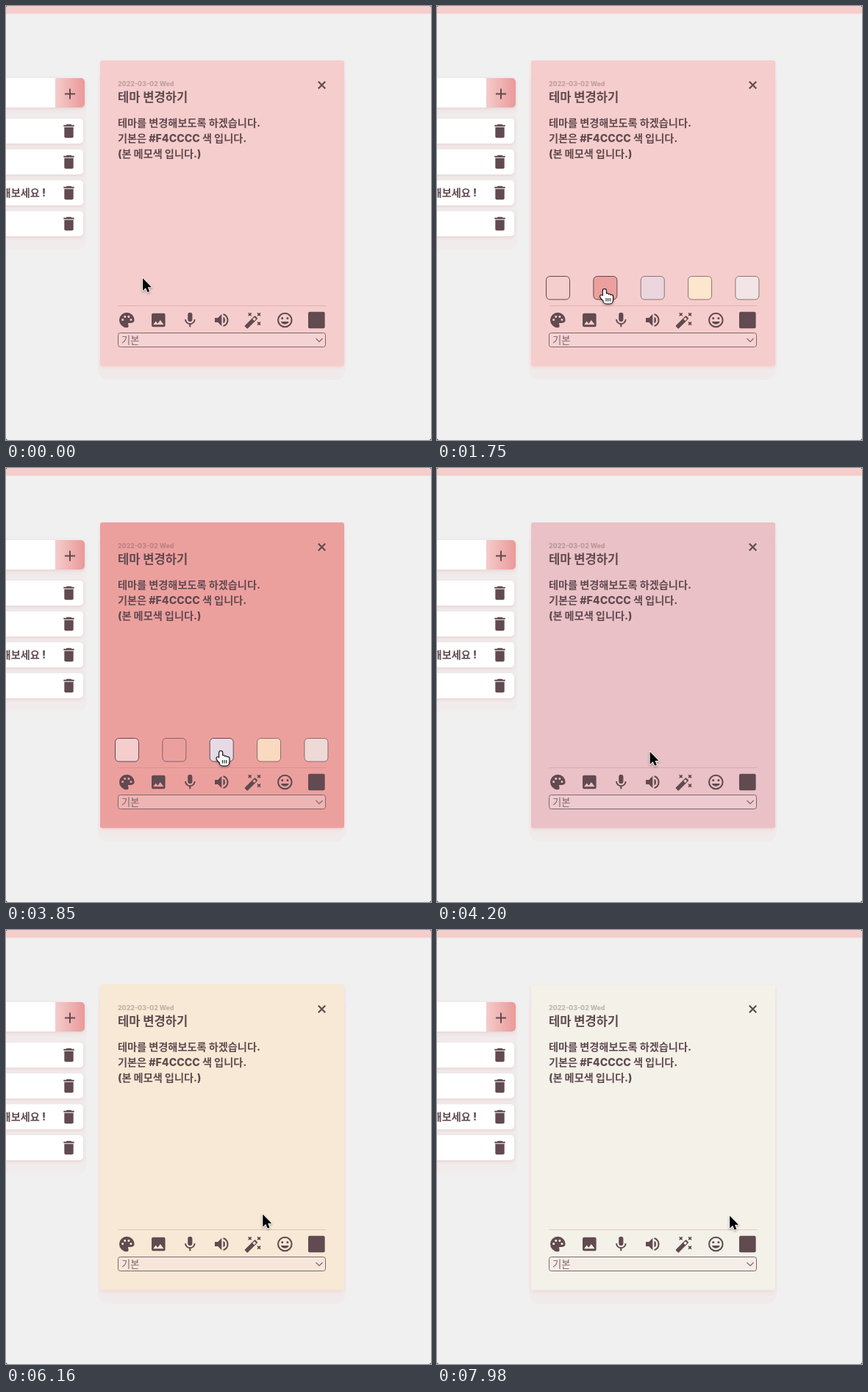
An HTML page with a canvas that plays this animation: 578 by 590 pixels, repeating every 8000 ms.

```html
<!DOCTYPE html>
<html lang="ko">
<head>
<meta charset="utf-8">
<style>
html, body { margin: 0; width: 100%; height: 100%; overflow: hidden; background: #f0f0f0; }
canvas { display: block; }
</style>
</head>
<body>
<canvas id="stage" width="578" height="590"></canvas>
<script>
const ctx = document.getElementById('stage').getContext('2d');
const LOOP = 8000;
const INK = '#614a50';
const INK_SOFT = '#80666b';
const FONT = 'Inter, "Noto Sans CJK KR", "Noto Sans CJK", sans-serif';

const THEMES = [[245, 205, 204], [236, 160, 158], [231, 218, 229], [255, 241, 205], [240, 241, 240]];
const FADE = 400;
const START = { x: 186, y: 370 };
const HOME = { x: 168, y: 424 };

// Each round: swatches open, the pointer leaves the palette button, reaches the next swatch, picks it.
const ROUNDS = [
  { open: 1120, leave: 1500, reach: 1750, pick: 2300 },
  { open: 3430, leave: 3600, reach: 3850, pick: 4070 },
  { open: 4970, leave: 5108, reach: 5800, pick: 6010 },
  { open: 6820, leave: 6860, reach: 7290, pick: 7790 }
];
const PRESS_LEAD = 180, LINGER = 80, RETURN = 600, ENTER = 80;

const swatchX = i => 148.5 + 64.35 * i;
const clamp = v => Math.min(1, Math.max(0, v));
const smooth = u => u * u * (3 - 2 * u);
const easeOut = u => 1 - (1 - u) ** 2;
const rgb = c => `rgb(${c.map(Math.round).join()})`;

// CSS "ease" curve
function ease(p) {
  if (p <= 0 || p >= 1) return clamp(p);
  const bez = (a, b, u) => 3 * a * u * (1 - u) ** 2 + 3 * b * u * u * (1 - u) + u ** 3;
  let lo = 0, hi = 1;
  for (let i = 0; i < 20; i++) {
    const mid = (lo + hi) / 2;
    if (bez(.25, .25, mid) < p) lo = mid; else hi = mid;
  }
  return bez(.1, 1, lo);
}

const legs = [];
const move = (from, to, x, y, curve) => legs.push({ from, to, x, y, curve });
move(0, RETURN, HOME.x, HOME.y, smooth);
ROUNDS.forEach(({ leave, reach, pick }, i) => {
  const x = swatchX(i + 1) + 15;
  move(leave, reach - ENTER, x, 400, easeOut);
  move(reach - ENTER, reach, x, 385, smooth);
  move(pick + LINGER, pick + LINGER + RETURN, HOME.x, HOME.y, smooth);
});

function pointerAt(t) {
  let { x, y } = START;
  for (const leg of legs) {
    const p = leg.curve(clamp((t - leg.from) / (leg.to - leg.from)));
    x += (leg.x - x) * p;
    y += (leg.y - y) * p;
  }
  return [x, y];
}

const memoColor = t => ROUNDS.reduce((color, { pick }, i) => {
  const p = ease((t - pick) / FADE);
  return color.map((v, k) => v + (THEMES[i + 1][k] - v) * p);
}, THEMES[0]);

const isOpen = t => ROUNDS.some(r => t >= r.open && t < r.pick);
const hasTooltip = t => ROUNDS.some((r, i) => {
  const arrival = i ? ROUNDS[i - 1].pick + LINGER + RETURN : RETURN;
  return t >= arrival - 100 && t < r.leave + 100;
});

function box(x, y, w, h, r, fill, stroke) {
  ctx.beginPath();
  ctx.roundRect(x, y, w, h, r);
  if (fill) { ctx.fillStyle = fill; ctx.fill(); }
  if (stroke) { ctx.strokeStyle = stroke; ctx.lineWidth = 1; ctx.stroke(); }
}

function shadowed(color, dy, blur, draw) {
  ctx.save();
  ctx.shadowColor = color;
  ctx.shadowOffsetY = dy;
  ctx.shadowBlur = blur;
  draw();
  ctx.restore();
}

function text(str, x, y, size, weight = 800, color = INK, align = 'left') {
  ctx.font = `${weight} ${size}px ${FONT}`;
  ctx.textAlign = align;
  ctx.fillStyle = color;
  ctx.fillText(str, x, y);
}

function line(color, width, ...points) {
  ctx.beginPath();
  points.forEach(([x, y]) => ctx.lineTo(x, y));
  ctx.strokeStyle = color;
  ctx.lineWidth = width;
  ctx.stroke();
}

function arc(x, y, r, from, to, width) {
  ctx.beginPath();
  ctx.arc(x, y, r, from, to);
  ctx.strokeStyle = INK;
  ctx.lineWidth = width;
  ctx.stroke();
}

function dots(path, r, ...centers) {
  for (const [x, y] of centers) {
    path.moveTo(x + r, y);
    path.arc(x, y, r, 0, Math.PI * 2);
  }
  return path;
}

function star(x, y) {
  ctx.beginPath();
  for (let i = 0; i < 8; i++) {
    const r = i % 2 ? 3.5 : 1.5, a = i * Math.PI / 4;
    ctx.lineTo(x + r * Math.cos(a), y + r * Math.sin(a));
  }
  ctx.fill();
}

// Icons are drawn around (0, 0) on a 24 unit grid.
const ICONS = {
  trash() {
    box(-6, -5, 12, 14, [0, 0, 2, 2], INK);
    box(-7, -8, 14, 2, 0, INK);
    box(-3.5, -9, 7, 2, [1, 1, 0, 0], INK);
  },
  palette() {
    const path = new Path2D('M0 10A10 10 0 1 1 10 0Q10 4 4 4H2Q1 5 2 6Q3 10 0 10Z');
    ctx.fill(dots(path, 1.5, [-5.5, -.5], [-2.5, -4.5], [2.5, -4.5], [5.5, -.5]), 'evenodd');
  },
  image() {
    const path = new Path2D('M-7 6L-3.5 1.5L-1 4.5L2.5 0L7 6Z');
    path.roundRect(-9, -9, 18, 18, 2);
    ctx.fill(path, 'evenodd');
  },
  mic() {
    box(-3, -10, 6, 12, 3, INK);
    arc(0, -1, 6.1, 0, Math.PI, 1.8);
    line(INK, 2, [0, 5], [0, 9]);
  },
  volume() {
    ctx.fill(new Path2D('M-9-3V3H-5L0 8V-8L-5-3Z'));
    ctx.beginPath();
    ctx.ellipse(2, 0, 2.5, 4, 0, -Math.PI / 2, Math.PI / 2);
    ctx.fill();
    arc(0, 0, 8, -1.3, 1.3, 2);
  },
  wand() {
    [[-4.5, -7.5], [7.5, -7.5], [7.5, 4.5]].forEach(p => star(...p));
    ctx.rotate(-Math.PI / 4);
    ctx.translate(-1.8, 0);
    const path = new Path2D();
    path.roundRect(-12, -2.7, 19.5, 5.4, 1);
    path.rect(2, -1.5, 3.4, 3);
    ctx.fill(path, 'evenodd');
  },
  smile() {
    arc(0, 0, 9, 0, Math.PI * 2, 2);
    ctx.fill(dots(new Path2D(), 1.5, [-3.5, -2.5], [3.5, -2.5]));
    ctx.beginPath();
    ctx.ellipse(0, 2, 5.1, 3.5, 0, 0, Math.PI);
    ctx.fill();
  },
  block() { box(-11, -11, 22, 22, 2, INK); }
};
const TOOLS = ['palette', 'image', 'mic', 'volume', 'wand', 'smile', 'block'];

function icon(name, x, y) {
  ctx.save();
  ctx.translate(x, y);
  ctx.scale(1.03, 1.03);
  ctx.fillStyle = INK;
  ICONS[name]();
  ctx.restore();
}

function drawList() {
  box(-20, 97, 129, 234, 10, '#f1ebeb');
  const soft = 'rgba(225,185,185,.45)';
  shadowed(soft, 2, 5, () => box(-20, 98, 127, 40, 5, '#fff'));
  const g = ctx.createLinearGradient(67, 0, 107, 0);
  g.addColorStop(0, '#f4cccc');
  g.addColorStop(1, '#ea9999');
  box(67, 98, 40, 40, [0, 5, 5, 0], g);
  line(INK, 2, [80, 119.5], [94, 119.5]);
  line(INK, 2, [87, 112.5], [87, 126.5]);
  for (let i = 0; i < 4; i++) {
    const y = 153 + 42 * i;
    shadowed(soft, 2, 5, () => box(-20, y, 125, 34, 5, '#fff'));
    icon('trash', 85.5, y + 17);
  }
  text('해보세요 !', 54, 259, 14.2, 800, INK, 'right');
}

function drawMemo(color) {
  box(125, 90, 337, 418, 14, '#f1eaea');
  shadowed('rgba(235,195,195,.5)', 2, 5, () => box(128, 74, 332, 415.5, 3, rgb(color)));
  ctx.globalAlpha = .35;
  text('2022-03-02 Wed', 152, 108.5, 8.8);
  ctx.globalAlpha = 1;
  text('테마 변경하기', 152, 129.5, 16.6);
  line(INK, 2.2, [424.8, 102.8], [434.2, 112.2]);
  line(INK, 2.2, [434.2, 102.8], [424.8, 112.2]);

  ['테마를 변경해보도록 하겠습니다.', '기본은 #F4CCCC 색 입니다.', '(본 메모색 입니다.)']
    .forEach((str, i) => text(str, 152, 164 + 21 * i, 14.2));

  line('rgba(180,110,110,.3)', 1, [152, 407.5], [435, 407.5]);
  TOOLS.forEach((name, i) => icon(name, 164.3 + 43 * i, 427));
  box(152.5, 444.5, 282, 19, 3, 'rgba(245,225,230,.3)', INK_SOFT);
  text('기본', 157, 459, 13.3, 400, INK_SOFT);
  line(INK_SOFT, 1.2, [421.5, 452], [426, 456.5], [430.5, 452]);
}

function drawRipple(t) {
  for (const { open } of ROUNDS) {
    const p = (t - open + 2 * PRESS_LEAD) / (1.5 * PRESS_LEAD);
    if (p <= 0 || p >= 1) continue;
    ctx.fillStyle = `rgba(0,0,0,${.08 * (1 - p)})`;
    ctx.fill(dots(new Path2D(), 40 * Math.min(1, .7 + p), [165.5, 428.5]));
  }
}

function drawTooltip() {
  box(152.5, 388, 53, 21, 3, INK);
  ctx.fill(new Path2D('M153 408H167L160 416Z'));
  text('테마 설정', 161, 402.5, 9.5, 700, '#fff');
}

function drawSwatches(hovered) {
  THEMES.forEach((color, i) => {
    ctx.globalAlpha = i === 0 || i === hovered ? 1 : .7;
    box(swatchX(i), 367.5, 32, 31.5, 5, rgb(color), INK);
  });
  ctx.globalAlpha = 1;
}

const ARROW = new Path2D('M0 0V17L4 13.3L6.5 19L9.2 17.9L6.8 12.2H12Z');
const HAND = new Path2D();
HAND.roundRect(-2, 0, 4, 14, 2);
for (let i = 0; i < 3; i++) HAND.roundRect(1.6 + 3 * i, 6 + i, 3.6, 9, 1.8);
HAND.roundRect(-1.5, 10, 12.4, 9.5, [1, 2, 4, 4]);
HAND.ellipse(-2.5, 11.8, 1.9, 4.2, -.7, 0, Math.PI * 2);

function drawPointer(x, y, hand) {
  const path = hand ? HAND : ARROW;
  ctx.save();
  ctx.translate(x, y);
  ctx.lineJoin = 'round';
  shadowed('rgba(0,0,0,.35)', 1.5, 3, () => {
    ctx.lineWidth = hand ? 2 : 1.8;
    ctx.strokeStyle = hand ? '#000' : '#fff';
    ctx.stroke(path);
  });
  ctx.fillStyle = hand ? '#fff' : '#000';
  ctx.fill(path);
  for (let i = 0; hand && i < 3; i++) line('#000', 1, [2.2 + 2.6 * i, 12], [2.2 + 2.6 * i, 16.5]);
  ctx.restore();
}

function render(t) {
  const [x, y] = pointerAt(t);
  const open = isOpen(t);
  const hovered = open && y > 367 && y < 399
    ? THEMES.findIndex((_, i) => x >= swatchX(i) && x <= swatchX(i) + 32) : -1;

  ctx.fillStyle = '#333';
  ctx.fillRect(0, 0, 578, 590);
  ctx.save();
  ctx.beginPath();
  ctx.roundRect(0, 0, 578, 590, 3);
  ctx.clip();
  ctx.fillStyle = '#f0f0f0';
  ctx.fillRect(0, 0, 578, 590);
  ctx.fillStyle = '#f5cdcb';
  ctx.fillRect(0, 0, 578, 10.5);
  drawList();
  drawMemo(memoColor(t));
  drawRipple(t);
  if (hasTooltip(t)) drawTooltip();
  if (open) drawSwatches(hovered);
  drawPointer(x, y, hovered >= 0);
  ctx.restore();
}

const began = performance.now();
function tick() {
  render((performance.now() - began) % LOOP);
  requestAnimationFrame(tick);
}
tick();
</script>
</body>
</html>
```
